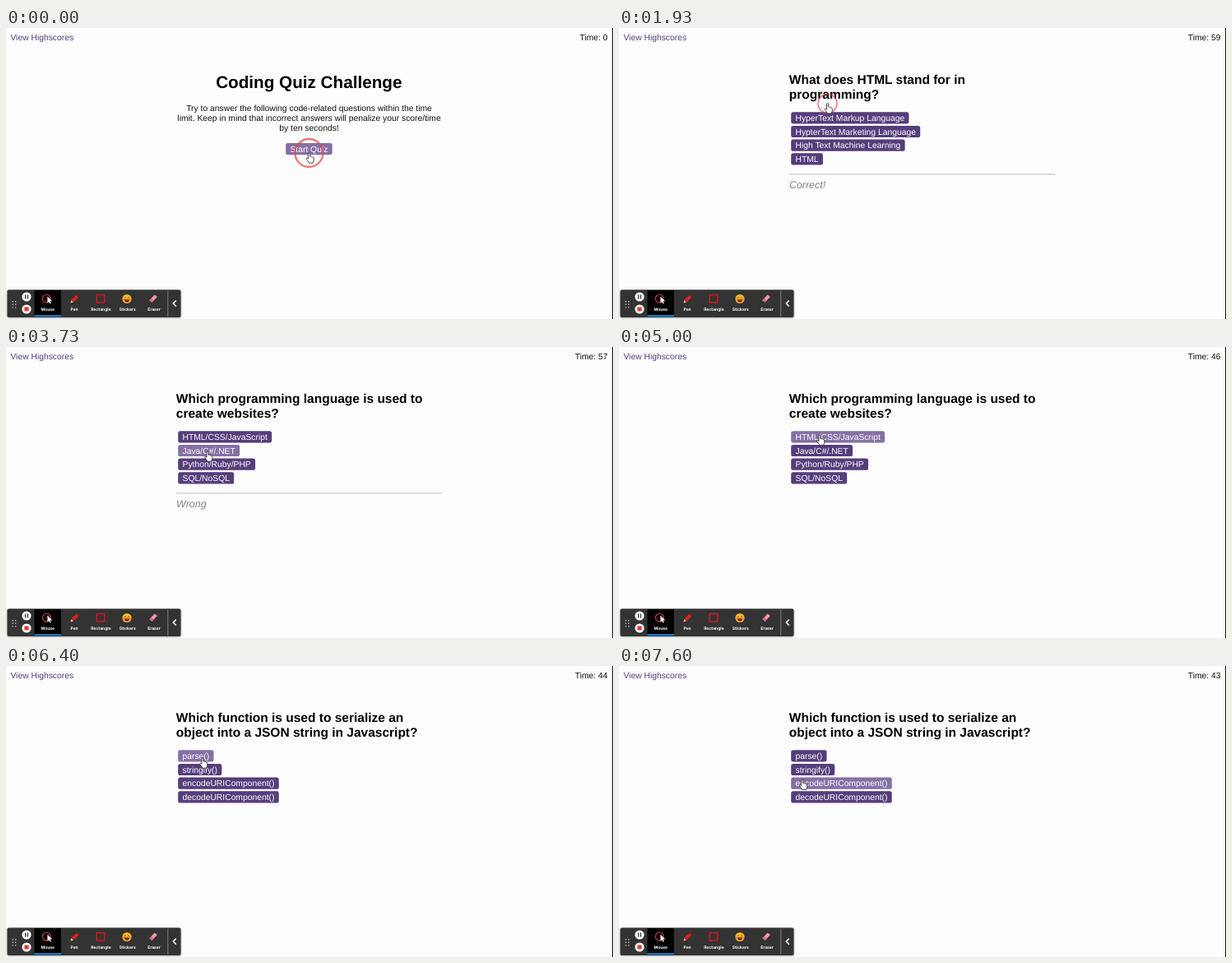
Write an HTML page that moves like this. It is 738 px wide and 354 px high and loops after 8 s.

```html
<!DOCTYPE html>
<html lang="en">
<head>
<meta charset="utf-8">
<title>Coding Quiz</title>
<style>
  html, body { margin: 0; width: 100%; height: 100%; overflow: hidden; background: #fdfdfd; }
  svg { display: block; width: 738px; height: 354px; }
  text { font-family: "Liberation Sans", Arial, sans-serif; font-size: 10.34px; text-rendering: geometricPrecision; white-space: pre; }
  .title { font-size: 20.68px; font-weight: 700; text-anchor: middle; }
  .question { font-size: 15.5px; font-weight: 700; }
  .intro { text-anchor: middle; fill: #111; }
  .label { fill: #fff; }
  .feedback { font-size: 12.41px; font-style: italic; fill: #808080; }
  .tool { font-family: Inter, sans-serif; font-size: 5px; font-weight: 700; fill: #fff; text-anchor: middle; }
</style>
</head>
<body>
<svg id="stage" viewBox="0 0 738 354" xmlns="http://www.w3.org/2000/svg">
  <rect width="738" height="354" fill="#fdfdfd"/>
  <text x="5.4" y="14.8" fill="#563d7c">View Highscores</text>
  <text id="time" x="731.6" y="14.8" text-anchor="end" fill="#111"></text>
  <g id="pages"></g>
  <g id="feedback">
    <rect x="207" y="177.2" width="323.2" height="1.3" fill="#ccc"/>
    <text id="verdict" class="feedback" x="207" y="195"></text>
  </g>
  <rect x="737" width="1" height="354" fill="#111"/>

  <g id="toolbar">
    <rect x="0.5" y="318" width="213" height="35.5" rx="3" fill="#000" opacity=".22"/>
    <rect x="1.5" y="318.5" width="211" height="33.5" rx="2.5" fill="#333"/>
    <path d="M8.3 332v9M11.7 332v9" stroke="#bbb" stroke-width="1.4" stroke-dasharray="1.4 2.2"/>
    <circle cx="25" cy="327" r="5.6" fill="#fff"/>
    <path d="M23.6 324.6v4.8M26.4 324.6v4.8" stroke="#333" stroke-width="1.3"/>
    <circle cx="25" cy="342" r="5.6" fill="#fff"/>
    <rect x="22.4" y="339.4" width="5.2" height="5.2" rx=".8" fill="#e53935"/>
    <rect x="34.5" y="319" width="32.5" height="32.5" fill="#000"/>
    <rect x="34.5" y="349.4" width="32.5" height="1.8" fill="#2196f3"/>
    <circle cx="49.3" cy="329.2" r="4.9" fill="none" stroke="#d8404a" stroke-width="1.1"/>
    <path d="M50.4 326.6v8l1.9-1.7 1.2 2.6 1.3-.6-1.2-2.5 2.5-.2z" fill="#fff"/>
    <path d="M78.4 334.5l1-3.5 2.5 2.5z" fill="#f5b9a5"/>
    <path d="M79.7 330.6l5.6-5.6 2.7 2.7-5.6 5.6z" fill="#e3201b"/>
    <path d="M85.7 324.6l.8-.7 2.6 2.6-.7.8z" fill="#b01010"/>
    <rect x="110.3" y="324.6" width="9.4" height="9.4" fill="none" stroke="#d5161b" stroke-width="1.5"/>
    <circle cx="147" cy="329.5" r="5.6" fill="#fbb829"/>
    <path d="M143.9 328.6q1.1-1.6 2.2 0M147.9 328.6q1.1-1.6 2.2 0" fill="none" stroke="#5b3413" stroke-width=".8"/>
    <path d="M143.8 330.2h6.4q-.6 3.5-3.2 3.5t-3.2-3.5z" fill="#7a2b18"/>
    <circle cx="143" cy="330.5" r="1" fill="#f07a3c"/>
    <circle cx="151" cy="330.5" r="1" fill="#f07a3c"/>
    <path d="M174.3 331.2l6.4-6.7 3.2 2.5-6.4 6.8z" fill="#f29aa5"/>
    <path d="M174.3 331.2l2.2-2.3 3.2 2.5-2.2 2.4z" fill="#d96d80"/>
    <path d="M196.8 319.5v31.5" stroke="#8a8a8a" stroke-width=".9"/>
    <path d="M206.8 331.6l-3.5 3.5 3.5 3.5" fill="none" stroke="#fff" stroke-width="1.5"/>
  </g>

  <circle id="ring" fill="none" stroke="#e8434b" stroke-opacity=".72"/>
  <g id="cursor" stroke="#222" stroke-width=".8" stroke-linejoin="round" fill="#fff">
    <path id="arrow" d="M0 0v9l2.1-1.9 1.4 3.1 1.5-.7-1.4-3 2.9-.2z"/>
    <path id="hand" d="M-1 .9q0-1.2 1-1.2t1 1.2v3.3q1.4-.5 1.8.5 1.2-.4 1.6.6 1.4-.2 1.4 1.3v2.2q0 1.2-.9 2.3v1.1h-5.3v-1l-2.7-3.4q-.7-1.2.2-1.5t1.9 1.1z"/>
  </g>
</svg>
<script>
const LOOP = 8000, EM = 10.34, PAD = 5.3, PITCH = 16.7;
const DARK = "#563d7c", LIGHT = "#8570a5";
const $ = id => document.getElementById(id);

function make(parent, tag, attrs, text) {
  const el = document.createElementNS("http://www.w3.org/2000/svg", tag);
  for (const key in attrs) el.setAttribute(key, attrs[key]);
  if (text) el.textContent = text;
  parent.appendChild(el);
  return el;
}

function addLines(parent, cls, x, y, step, lines) {
  lines.forEach((s, i) => make(parent, "text", { class: cls, x, y: y + i * step }, s));
}

function addButton(parent, text, x, cy, centred) {
  const rect = make(parent, "rect", { height: 14.2, rx: 2.6, y: cy - 7.1 });
  const label = make(parent, "text", { class: "label", y: cy + 3.7 }, text);
  const w = label.getComputedTextLength() + 2 * PAD;
  const left = centred ? x - w / 2 : x;
  rect.setAttribute("x", left);
  rect.setAttribute("width", w);
  label.setAttribute("x", left + PAD);
  return { rect, contains: (px, py) => px >= left && px <= left + w && Math.abs(py - cy) <= 7.1 };
}

const newGroup = () => make($("pages"), "g", {});

function introPage() {
  const g = newGroup();
  addLines(g, "title", 368.3, 73, 0, ["Coding Quiz Challenge"]);
  addLines(g, "intro", 368.5, 101, 11.9, [
    "Try to answer the following code-related questions within the time",
    "limit. Keep in mind that incorrect answers will penalize your score/time",
    "by ten seconds!"
  ]);
  return { g, start: 0, buttons: [addButton(g, "Start Quiz", 368.4, 147.1, true)] };
}

function questionPage(start, lines, answers) {
  const g = newGroup();
  addLines(g, "question", 206.8, 68, 17.85, lines);
  const top = 73.6 + 17.85 * lines.length;
  const buttons = answers.map((a, i) => addButton(g, a, 209.2, top + i * PITCH));
  return { g, start, buttons };
}

const pages = [
  introPage(),
  questionPage(260, ["Javascript is an _______ language?"],
    ["Object-Oriented", "Object-Based", "Procedural", "None of the above"]),
  questionPage(1860, ["What does HTML stand for in", "programming?"],
    ["HyperText Markup Language", "HypterText Marketing Language", "High Text Machine Learning", "HTML"]),
  questionPage(3430, ["Which programming language is used to", "create websites?"],
    ["HTML/CSS/JavaScript", "Java/C#/.NET", "Python/Ruby/PHP", "SQL/NoSQL"]),
  questionPage(5200, ["Which function is used to serialize an", "object into a JSON string in Javascript?"],
    ["parse()", "stringify()", "encodeURIComponent()", "decodeURIComponent()"])
];

const verdicts = [[1860, "Correct!"], [3430, "Wrong"], [5200, "Correct!"]];
const presses = [[-200, 260], [1440, 1860], [3240, 3430], [5020, 5200]];

["Mouse", "Pen", "Rectangle", "Stickers", "Eraser"].forEach((name, i) =>
  make($("toolbar"), "text", { class: "tool", x: 50.8 + i * 32.3, y: 344 }, name));

// time, x, y of the pointer tip
const path = [
  [0, 368.4, 152], [300, 368.4, 152], [840, 309.6, 124.5], [940, 309.6, 124.5],
  [1430, 253.5, 91.8], [1960, 253.5, 91.8], [2320, 249, 116], [2540, 249, 116],
  [3200, 245, 127], [4270, 245, 127], [4950, 244, 107.3], [5250, 244, 107.3],
  [5520, 240, 111], [6070, 240, 111], [6380, 239, 112], [6430, 239, 112],
  [6850, 234, 121], [6940, 234, 121], [7560, 222.8, 138.3], [LOOP, 222.8, 138.3]
];

function pointerAt(t) {
  const i = path.findIndex(p => p[0] > t);
  const [t0, x0, y0] = path[i - 1], [t1, x1, y1] = path[i];
  const u = (t - t0) / (t1 - t0), e = u * u * (3 - 2 * u);
  return [x0 + (x1 - x0) * e, y0 + (y1 - y0) * e];
}

// Grows while pressed, shrinks away after release.
function ringScale(t) {
  const press = presses.find(([down, up]) => t >= down && t < up + 220);
  if (!press) return 0;
  const [down, up] = press;
  return t < up ? Math.min(1, (t - down) / 80) : 1 - (t - up) / 220;
}

function clock(t) {
  if (t < 1260) return 0;
  return 59 - Math.floor((t - 1260) / 1000) - (t >= 4260 ? 10 : 0);
}

const show = (el, on) => el.setAttribute("visibility", on ? "visible" : "hidden");

function draw(t) {
  const page = pages.filter(p => p.start <= t).pop();
  pages.forEach(p => p.g.setAttribute("display", p === page ? "inline" : "none"));
  $("time").textContent = "Time: " + clock(t);

  const verdict = verdicts.find(([at]) => t >= at && t < at + 1000);
  show($("feedback"), verdict);
  $("verdict").textContent = verdict ? verdict[1] : "";

  const [x, y] = pointerAt(t);
  let over = false;
  page.buttons.forEach(b => {
    const hit = b.contains(x, y);
    b.rect.setAttribute("fill", hit ? LIGHT : DARK);
    over = over || hit;
  });
  const hand = over || presses.some(([, up]) => t >= up && t < up + 110);
  show($("hand"), hand);
  show($("arrow"), !hand);
  $("cursor").setAttribute("transform", `translate(${x} ${y})`);

  const k = ringScale(t), ring = $("ring");
  ring.setAttribute("cx", x);
  ring.setAttribute("cy", y);
  ring.setAttribute("r", 17 * k);
  ring.setAttribute("stroke-width", 2.3 * k);
}

const begin = performance.now();
function frame() {
  draw((performance.now() - begin) % LOOP);
  requestAnimationFrame(frame);
}
frame();
</script>
</body>
</html>
```
